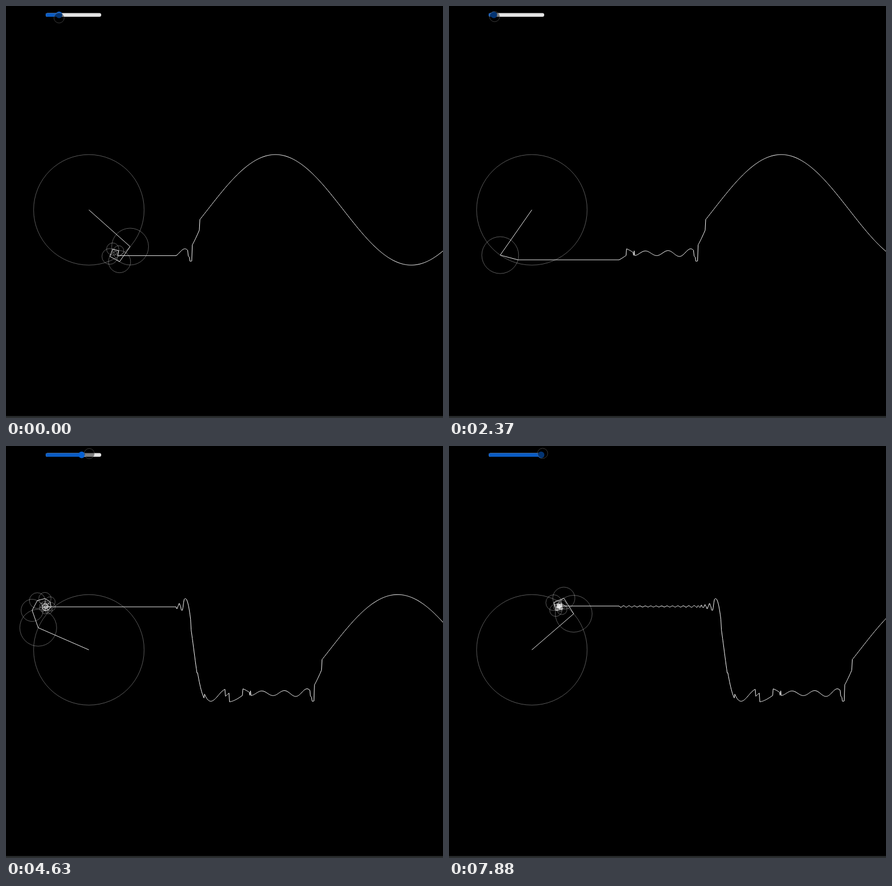
These frames come from a looping animation (771x727 px, 8 s). An HTML page with a canvas:

```html
<!DOCTYPE html>
<html lang="en">
<head>
<meta charset="utf-8">
<title>Fourier series</title>
<style>
  html, body { margin: 0; width: 100%; height: 100%; overflow: hidden; background: #000; }
  canvas { display: block; }
</style>
</head>
<body>
<canvas id="stage" width="771" height="727"></canvas>
<script>
const ctx = document.getElementById('stage').getContext('2d');
const WIDTH = 771, HEIGHT = 727, LOOP = 8000, STEPS = 61;
const CX = 146.2, CY = 359.7, RADIUS = 97.5, WAVE_X = 300;

// Angles are in degrees of the largest circle; the wave gains six samples a step.
const START_ANGLE = 41.7, STEP_ANGLE = 4.625;
const SAMPLE_ANGLE = STEP_ANGLE / 6, SAMPLE_PX = SAMPLE_ANGLE / 0.751;

const MAX_TERMS = 25, DRAG_LEAD = 6;
// Key points of the slider drag: [angle, slider value under the pointer].
const DRAG = [[5.9, 1], [20.3, 2.5], [20.8, 3.5], [26.2, 5.5], [30, 6],
  [104.3, 6], [106, 3], [124, 2], [133, 2.5], [138.6, 3.5], [166.4, 4.5],
  [184, 6.5], [184.2, 7.6], [192.8, 8.5], [194.5, 10.6], [216, 25],
  [235, 48.3], [247, 48.3], [290, 26.8], [330, 25.6]];

const clamp = (value, low, high) => Math.min(Math.max(value, low), high);

function dragValue(angle) {
  const found = DRAG.findIndex(key => key[0] > angle);
  if (found < 1) return found ? DRAG.at(-1)[1] : DRAG[0][1];
  const [a0, v0] = DRAG[found - 1], [a1, v1] = DRAG[found];
  return v0 + (v1 - v0) * (angle - a0) / (a1 - a0);
}

const termCount = angle => Math.min(Math.round(dragValue(angle)), MAX_TERMS);
const sliderX = value => 75.5 + (value - 1) * 3.625;

// Joints of the arm, from the centre to the tip.
function arm(angle) {
  const joints = [{ x: CX, y: CY, r: RADIUS }];
  const count = termCount(angle);
  for (let i = 0; i < count; i++) {
    const n = 2 * i + 1, phase = n * angle * Math.PI / 180;
    const { x, y, r } = joints[i];
    joints.push({ x: x + r * Math.cos(phase), y: y + r * Math.sin(phase), r: RADIUS / (n + 2) });
  }
  return joints;
}

function circle(x, y, r) {
  ctx.beginPath();
  ctx.arc(x, y, r, 0, 2 * Math.PI);
}

function polyline(points, color) {
  ctx.beginPath();
  points.forEach(p => ctx.lineTo(p.x, p.y));
  ctx.strokeStyle = color;
  ctx.stroke();
}

function drawSeries(angle) {
  const joints = arm(angle), tip = joints.at(-1);
  ctx.strokeStyle = 'rgba(255,255,255,.35)';
  joints.slice(0, -1).forEach(({ x, y, r }) => { circle(x, y, r); ctx.stroke(); });
  polyline(joints, '#eee');
  polyline([tip, { x: WAVE_X, y: tip.y }], '#e4e4e4');

  const wave = [];
  for (let i = 0; i * SAMPLE_PX < WIDTH - WAVE_X + 2; i++) {
    wave.push({ x: WAVE_X + i * SAMPLE_PX, y: arm(angle - i * SAMPLE_ANGLE).at(-1).y });
  }
  polyline(wave, '#fff');
}

function bar(width, color) {
  ctx.beginPath();
  ctx.roundRect(70, 12.5, width, 6.4, 3.2);
  ctx.fillStyle = color;
  ctx.fill();
}

function drawSlider(value) {
  const x = sliderX(value);
  bar(98, '#e4e4e4');
  bar(x - 70, '#0b5cc4');
  circle(x, 15.6, 5.8);
  ctx.fillStyle = '#0660d2';
  ctx.fill();
}

function drawPointer(angle) {
  const y = clamp(21 - (angle - 92) * 0.068, 13, 21);
  circle(sliderX(dragValue(angle + DRAG_LEAD)), y, 9);
  ctx.fillStyle = 'rgba(0,0,0,.45)';
  ctx.fill();
  ctx.strokeStyle = 'rgba(140,140,140,.4)';
  ctx.stroke();
}

function draw(time) {
  const step = Math.min(Math.floor((time % LOOP + 10) * STEPS / LOOP), STEPS - 1);
  const angle = START_ANGLE + step * STEP_ANGLE;
  ctx.fillStyle = '#000';
  ctx.fillRect(0, 0, WIDTH, HEIGHT);
  drawSeries(angle);
  drawSlider(termCount(angle));
  drawPointer(angle);
  ctx.fillStyle = '#2a2d2e';
  ctx.fillRect(0, 723.5, WIDTH, 4);
}

let begin;
function tick(now) {
  begin ??= now;
  draw(now - begin);
  requestAnimationFrame(tick);
}
draw(0);
requestAnimationFrame(tick);
</script>
</body>
</html>
```
